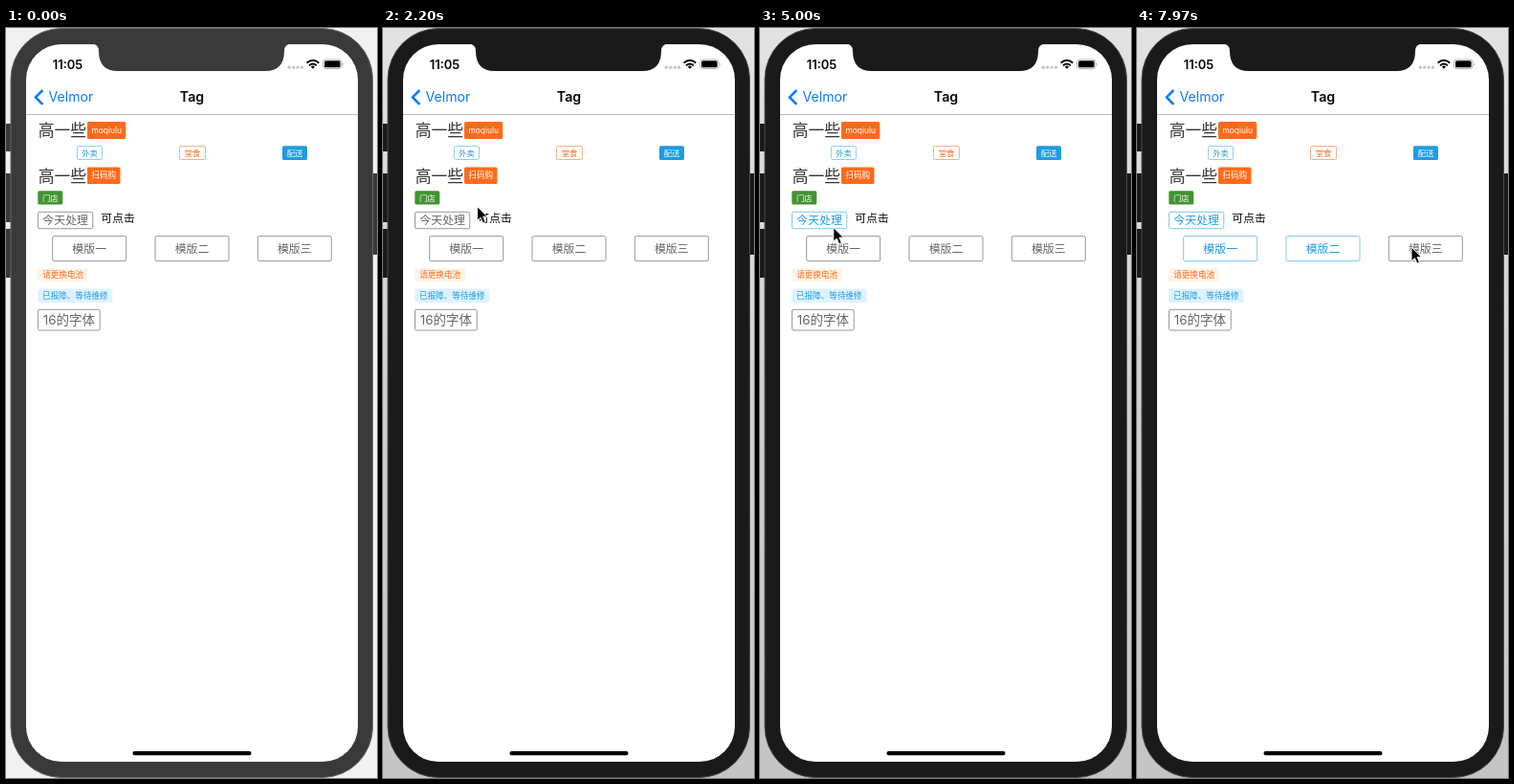
Write an HTML page that moves like this. It is 388 px wide and 784 px high and loops after 8 s.

```html
<!DOCTYPE html>
<html lang="zh-CN">
<head>
<meta charset="utf-8">
<style>
html, body { margin: 0; width: 100%; height: 100%; overflow: hidden; background: #f1f1f1; }
svg { display: block; width: 100vw; height: 100vh; }
text { font-family: Inter, "Noto Sans CJK SC", "Noto Sans CJK", sans-serif; }
</style>
</head>
<body>
<svg id="stage" viewBox="0 0 388 784">
  <defs>
    <linearGradient id="shade" x2="0" y2="1">
      <stop stop-color="#e2e2e2"/><stop offset=".5" stop-color="#cfcfcf"/><stop offset="1" stop-color="#c4c4c4"/>
    </linearGradient>
  </defs>
  <rect id="back" width="388" height="784"/>
  <g id="body">
    <path d="M0 100h6v29H0zM0 152h6v51H0zM0 210h6v51H0zM382 152h6v85h-6z"/>
    <rect id="shell" x="5" y=".5" width="378.5" height="783" rx="53"/>
  </g>
  <rect x="21" y="17" width="347" height="750" rx="37" fill="#fff"/>
  <path id="notch" d="M90 16.5Q97 17 97 24Q97 45 117 45H271Q291 45 291 24Q291 17 298 16.5Z"/>
  <path d="M21 90.5H368" stroke="#bcbcbc"/>
  <path d="M38.3 65L31 72.4L38.3 79.8" fill="none" stroke="#0a7aff" stroke-width="2.5"/>
  <g fill="#c3c3c3">
    <circle cx="296.3" cy="41.2" r="1.6"/><circle cx="300.7" cy="41.2" r="1.6"/>
    <circle cx="305.1" cy="41.2" r="1.6"/><circle cx="309.5" cy="41.2" r="1.6"/>
  </g>
  <g fill="none" stroke="#000" stroke-width="2">
    <path d="M314.6 36.4Q320.9 31 327.2 36.4M317 39.2Q320.9 35.9 324.8 39.2"/>
    <path d="M318.8 40.4Q320.9 38.8 323 40.4L320.9 42.7Z" fill="#000" stroke="none"/>
  </g>
  <rect x="331.6" y="33" width="19.4" height="9.6" rx="2.7" fill="none" stroke="#aaa" stroke-width=".9"/>
  <rect x="333" y="34.3" width="16.6" height="7" rx="1.5"/>
  <path d="M352.2 36.2q1.4 1.6 0 3.2z" fill="#999"/>
  <rect x="132.5" y="756" width="124" height="4.3" rx="2.1"/>
  <g id="page"></g>
  <path id="cursor" d="M0 0V14.8L3.4 11.6L5.8 17.2L8.5 16L6.1 10.6H10.6Z" fill="#000" stroke="#fff" stroke-width="1" stroke-linejoin="round"/>
</svg>
<script>
const LOOP = 8000;
const BLUE = '#1f9ce3', ORANGE = '#ff6a1a', GREY = '#666';
const $ = id => document.getElementById(id);
const page = $('page');

function add(tag, attrs, content) {
  const el = document.createElementNS('http://www.w3.org/2000/svg', tag);
  for (const key in attrs) el.setAttribute(key, attrs[key]);
  if (content) el.textContent = content;
  page.append(el);
  return el;
}

function label(str, x, y, size, fill, extra) {
  return add('text', { x, y, 'font-size': size, fill, ...extra }, str);
}

// Tag with its text centred in the box
function tag(str, x, y, w, h, size, ink, fill = '#fff', line = 'none') {
  const box = add('rect', { x, y, width: w, height: h, rx: 1.6, fill, stroke: line, 'stroke-width': 0.9 });
  const text = label(str, x + w / 2, y + h / 2 + size * 0.37, size, ink, { 'text-anchor': 'middle' });
  return { box, text };
}

const mid = { 'text-anchor': 'middle', 'font-weight': 600 };
label('11:05', 64.5, 42.5, 13, '#000', mid);
label('Tag', 194.5, 77.2, 14.2, '#000', mid);
label('Velmor', 44.5, 77.2, 14.1, '#0a7aff');

label('高一些', 33.7, 113.3, 16.8, '#333');
tag('moqiulu', 85, 98, 40.3, 18, 8.4, '#fff', ORANGE);
tag('外卖', 74.5, 123.5, 26, 14, 8.4, BLUE, '#fff', '#86c9ef');
tag('堂食', 181.5, 123.5, 27, 14, 8.4, ORANGE, '#fff', '#f3a67c');
tag('配送', 289, 123.3, 26, 14.7, 8.4, '#fff', BLUE);
label('高一些', 33.7, 160.6, 16.8, '#333');
tag('扫码购', 85, 145.5, 34.5, 17.5, 8.6, '#fff', ORANGE);
tag('门店', 33.3, 170.2, 26, 14.4, 8.4, '#fff', '#429330');
label('可点击', 99.3, 202.8, 11.8, '#111');
tag('请更换电池', 33.3, 251.2, 52.7, 14, 8.6, ORANGE, '#fff3e8');
tag('已报障、等待维修', 33.3, 272.6, 78, 14.4, 8.6, BLUE, '#def2fe');
tag('16的字体', 33.5, 294.3, 64.7, 21.7, 13.5, GREY, '#fff', '#8c8c8c');

const option = (at, ...place) => ({ at, ...tag(...place, 11.9, GREY, '#fff', '#8c8c8c') });
const options = [
  option(4500, '今天处理', 33.5, 192.3, 57.3, 17.4),
  option(6250, '模版一', 48.7, 217.6, 77, 26),
  option(7250, '模版二', 156, 217.6, 77, 26),
  option(LOOP, '模版三', 263.3, 217.6, 77, 26)
];

// Pointer stops: time, x, y
const stops = [
  [400, 16, 264], [900, 86, 128], [1600, 86, 128], [2500, 103, 207], [3400, 103, 207],
  [4000, 76, 206], [4900, 76, 206], [5500, 87, 239], [6500, 87, 239],
  [7050, 186, 226], [7400, 186, 226], [7850, 287, 229], [LOOP, 287, 229]
];

function pointer(t) {
  const i = stops.findIndex(s => s[0] > t);
  const [a, x0, y0] = stops[i - 1], [b, x1, y1] = stops[i];
  const p = (t - a) / (b - a), k = p * p * (3 - 2 * p);
  return [x0 + (x1 - x0) * k, y0 + (y1 - y0) * k];
}

function draw(t) {
  const active = t >= 1000;
  const shell = active ? '#1a1a1a' : '#3a3a3a';
  $('back').setAttribute('fill', active ? 'url(#shade)' : '#f1f1f1');
  $('body').setAttribute('fill', shell);
  $('notch').setAttribute('fill', shell);
  $('shell').setAttribute('stroke', active ? '#4a4a4a' : '#666');

  for (const { at, box, text } of options) {
    const on = t >= at;
    box.setAttribute('stroke', on ? '#72c2ee' : '#8c8c8c');
    text.setAttribute('fill', on ? BLUE : GREY);
  }

  const shown = t >= stops[0][0];
  $('cursor').setAttribute('visibility', shown ? 'visible' : 'hidden');
  if (shown) $('cursor').setAttribute('transform', `translate(${pointer(t)})`);
}

const start = performance.now();
function tick() {
  draw((performance.now() - start) % LOOP);
  requestAnimationFrame(tick);
}
tick();
</script>
</body>
</html>
```
